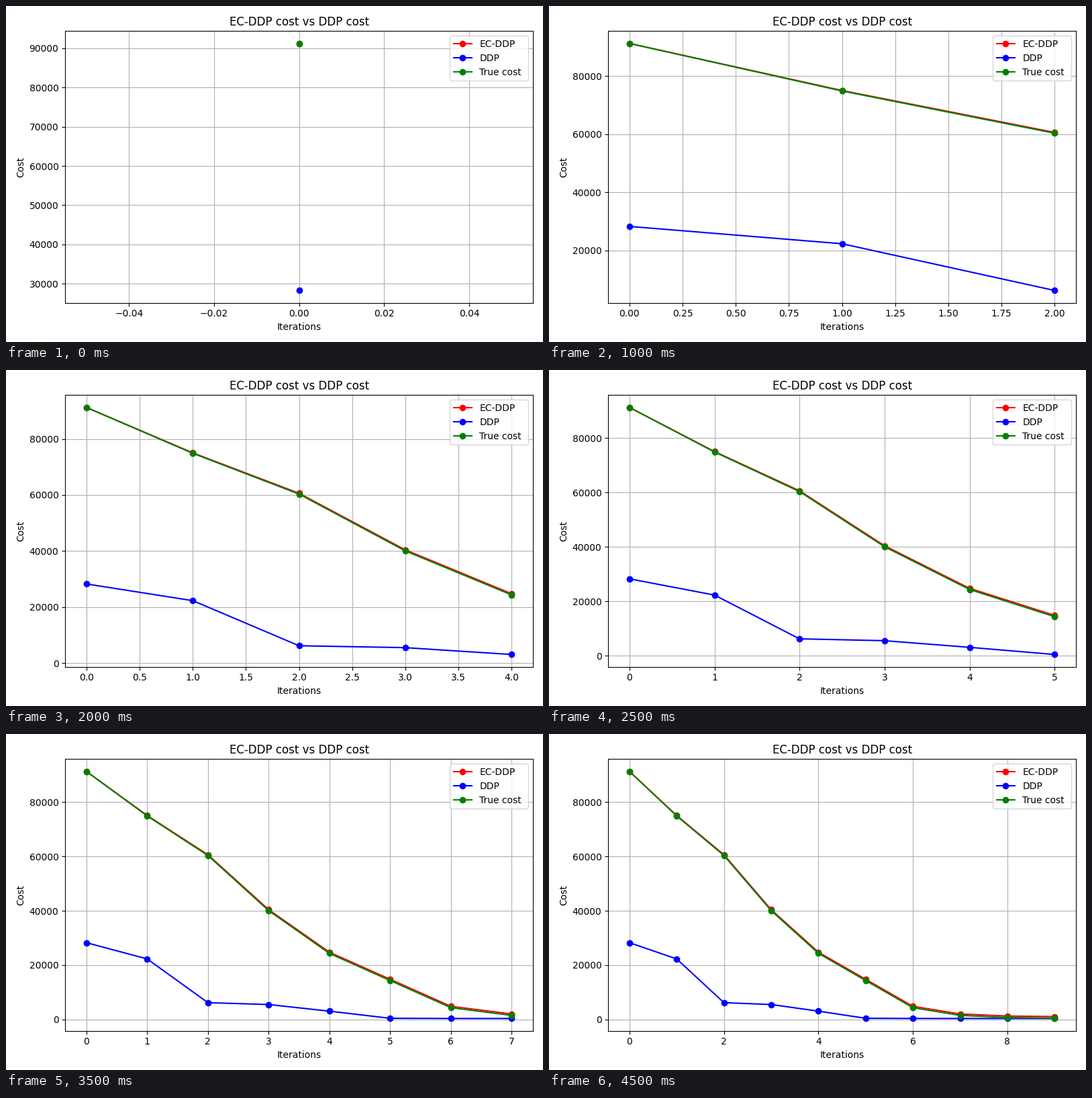
Animation, 800 px wide and 500 px high, one loop 5 s. Source, as a matplotlib script:

```python
import numpy as np
import matplotlib.pyplot as plt
from matplotlib.animation import FuncAnimation

STEPS = 10


def settle(key_costs, floor, ratio):
    """Follow the key costs, then decay geometrically towards floor."""
    costs = list(key_costs)
    while len(costs) < STEPS:
        costs.append(floor + (costs[-1] - floor) * ratio)
    return np.array(costs)


ec_ddp = settle([91230, 75030, 60600, 40400, 24750, 14800, 4850], 1000, 0.27)
ddp = settle([28250, 22290, 6200, 5520, 3080, 450], 380, 0.2)
# The estimate drifts away from the true cost and levels off.
true_cost = ec_ddp - 580 * (1 - np.exp(-np.arange(STEPS) / 3))

SERIES = [
    ("EC-DDP", ec_ddp, "red"),
    ("DDP", ddp, "blue"),
    ("True cost ", true_cost, "green"),
]

plt.rcParams["font.family"] = "DejaVu Sans"
fig, ax = plt.subplots(figsize=(8, 5), dpi=100)


def draw(i):
    """Plot every series up to iteration i with freshly scaled axes."""
    ax.clear()
    for label, costs, color in SERIES:
        ax.plot(costs[:i + 1], marker="o", color=color, label=label)
    ax.set_title("EC-DDP cost vs DDP cost")
    ax.set_xlabel("Iterations")
    ax.set_ylabel("Cost")
    ax.grid(True)
    ax.legend(loc="upper right")
    fig.tight_layout()


anim = FuncAnimation(fig, draw, frames=STEPS, init_func=lambda: draw(0),
                     interval=500, repeat=True, repeat_delay=0)
plt.show()
```
